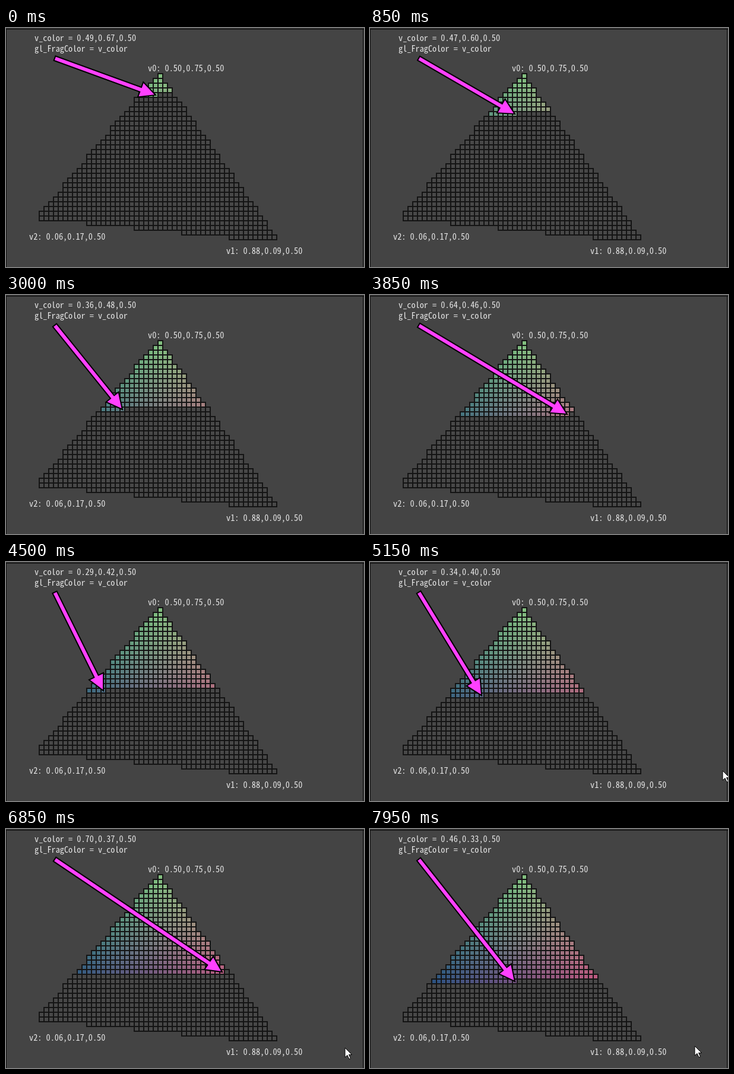
An HTML page with a canvas for the animation above (8 s loop, 603 by 403 pixels).

```html
<!DOCTYPE html>
<html>
<head>
<meta charset="utf-8">
<style>
  html, body { margin: 0; width: 100%; height: 100%; overflow: hidden; background: #444; }
  canvas { display: block; }
</style>
</head>
<body>
<canvas id="stage" width="603" height="403"></canvas>
<script>
const ctx = document.getElementById('stage').getContext('2d');
const LOOP = 8000, STEP = 50;
const CELL = 8, LEFT = 56, TOP = 77;
const TAIL = { x: 82, y: 51 };

const vertices = [
  { col: 25, row: 0, color: [0.50, 0.75, 0.50], labelX: 239, labelY: 73 },
  { col: 50, row: 35, color: [0.88, 0.09, 0.50], labelX: 371, labelY: 381 },
  { col: 0, row: 30, color: [0.06, 0.17, 0.50], labelX: 39, labelY: 357 }
];

const formatColor = color => color.map(v => v.toFixed(2)).join();

// Twice the signed area spanned by edge a-b and point p.
const area = (a, b, p) =>
  (b.col - a.col) * (p.row - a.row) - (b.row - a.row) * (p.col - a.col);

function varyingAt(p) {
  const [a, b, c] = vertices;
  const weights = [area(b, c, p), area(c, a, p), area(a, b, p)];
  return a.color.map((_, n) =>
    weights.reduce((sum, w, i) => sum + w * vertices[i].color[n], 0) / area(a, b, c));
}

// Rasterise the triangle in scan order.
const cells = [];
for (let row = 0; row < 35; row++) {
  const first = row > 30 ? 10 * (row - 30) : 25 - row + Math.floor(row / 6);
  const last = 25 + Math.floor(row * 5 / 7);
  for (let col = first; col <= last; col++) {
    cells.push({
      x: LEFT + col * CELL,
      y: TOP + row * CELL,
      color: varyingAt({ col: col + 0.52, row: row + 0.1 })
    });
  }
}

// Nearly constant scan speed, sagging slightly mid-loop.
function scanIndex(t) {
  const tick = t / STEP;
  return Math.round(16 + 2.39 * tick - 1.3 * Math.sin(Math.PI * t / LOOP));
}

function ease(t, from, to) {
  const k = Math.min(1, Math.max(0, (t - from) / (to - from)));
  return k * k * (3 - 2 * k);
}

function polygon(points, fill, lineWidth) {
  ctx.beginPath();
  points.forEach(([x, y]) => ctx.lineTo(x, y));
  ctx.closePath();
  ctx.fillStyle = fill;
  ctx.fill();
  ctx.strokeStyle = '#000';
  ctx.lineWidth = lineWidth;
  ctx.stroke();
}

function drawBackground() {
  ctx.fillStyle = '#444';
  ctx.fillRect(0, 0, 603, 403);
  ctx.fillStyle = '#0c0c0c';
  ctx.fillRect(0, 1, 603, 1.5);
  ctx.fillRect(0, 1, 1, 402);
  ctx.fillRect(601, 1, 1, 402);
}

function drawGrid(done) {
  ctx.beginPath();
  cells.forEach(({ x, y, color }, i) => {
    ctx.fillStyle = i <= done ? `rgb(${color.map(v => Math.round(v * 255))})` : '#484848';
    ctx.fillRect(x, y, CELL, CELL);
    ctx.rect(x, y, CELL, CELL);
  });
  ctx.strokeStyle = '#141414';
  ctx.lineWidth = 2;
  ctx.stroke();
}

function drawLabels(color) {
  ctx.font = '14.25px "Noto Sans Mono CJK KR", "Noto Sans Mono CJK JP", "Noto Sans Mono CJK SC", monospace';
  ctx.fillStyle = '#e8e8e8';
  ctx.fillText('v_color = ' + formatColor(color), 48, 22);
  ctx.fillText('gl_FragColor = v_color', 48, 40);
  vertices.forEach((v, i) =>
    ctx.fillText(`v${i}: ${formatColor(v.color)}`, v.labelX, v.labelY));
}

function drawArrow(x, y) {
  const dx = x - TAIL.x, dy = y - TAIL.y, length = Math.hypot(dx, dy);
  const neck = length - 27;
  const side = [[0, 4], [neck, 4], [neck, 13.5]];
  const mirrored = side.map(([u, v]) => [u, -v]).reverse();
  polygon([...side, [length, 0], ...mirrored].map(([u, v]) => [
    TAIL.x + (u * dx - v * dy) / length,
    TAIL.y + (u * dy + v * dx) / length
  ]), '#ff40ff', 2);
}

function drawPointer(t) {
  const enter = ease(t, 4800, 5100), leave = ease(t, 6950, 7600);
  const x = 594 - 23 * ease(t, 5200, 5900) - 24 * leave;
  const y = 404 - 52 * enter + 17 * ease(t, 5500, 6400) - 3 * leave;
  const outline = [[0, 0], [0, 16], [4, 12.5], [7, 19], [9.5, 18], [6.5, 11.5], [11.5, 11.5]];
  polygon(outline.map(([u, v]) => [x + u, y + v]), '#fff', 1);
}

function draw(t) {
  const { x, y, color } = cells[scanIndex(t)];
  drawBackground();
  drawGrid(scanIndex(t));
  drawLabels(color);
  drawArrow(x + CELL / 2, y + CELL / 2);
  drawPointer(t);
}

function frame() {
  const t = performance.now() % LOOP;
  draw(Math.floor(t / STEP) * STEP);
  requestAnimationFrame(frame);
}
frame();
</script>
</body>
</html>
```
